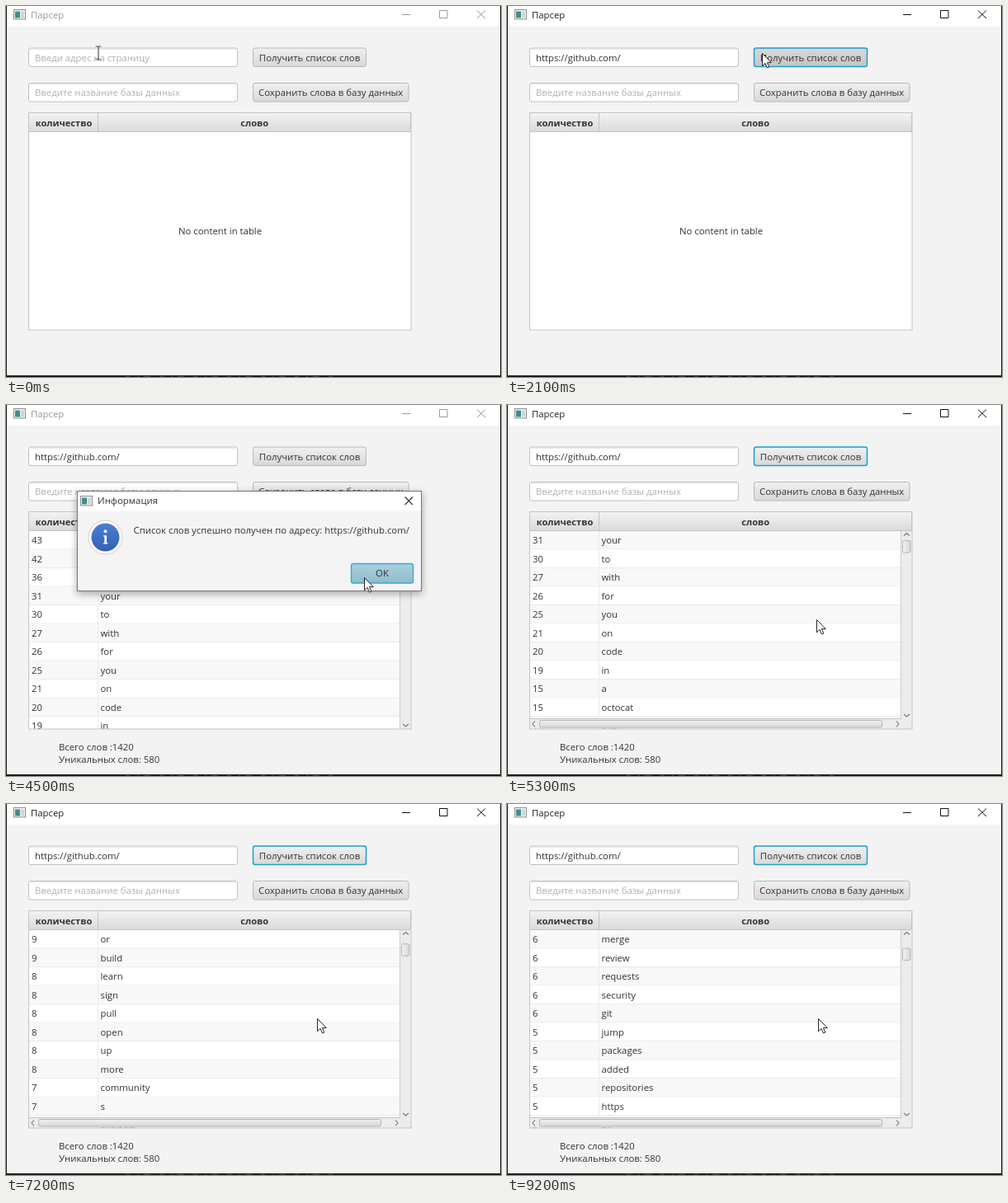
Animation of 600 by 450 pixels, one loop 9700 ms. Source, as an HTML page:

```html
<!DOCTYPE html>
<html lang="ru">
<head>
<meta charset="utf-8">
<title>Парсер</title>
<style>
html, body { margin: 0; width: 100%; height: 100%; overflow: hidden; background: #1c1c1c; }
svg { display: block; width: 600px; height: 450px; }
text { font: 11.35px "Open Sans", "Noto Sans", sans-serif; fill: #333; white-space: pre; }
.mid { text-anchor: middle; }
.head { font-weight: 700; font-size: 11.15px; }
.hint { fill: #b2b2b2; }
.line { fill: none; stroke: #c4c4c4; }
.arrow { fill: none; stroke: #777; stroke-width: 1.1; }
</style>
</head>
<body>
<svg viewBox="0 0 600 450">
  <defs>
    <linearGradient id="btn" x2="0" y2="1"><stop stop-color="#f0f0f0"/><stop offset="1" stop-color="#d8d8d8"/></linearGradient>
    <linearGradient id="btnDown" x2="0" y2="1"><stop stop-color="#d9d9d9"/><stop offset="1" stop-color="#c4c4c4"/></linearGradient>
    <linearGradient id="head" x2="0" y2="1"><stop stop-color="#f3f3f3"/><stop offset="1" stop-color="#d9d9d9"/></linearGradient>
    <linearGradient id="ok" x2="0" y2="1"><stop stop-color="#cdeaf5"/><stop offset="1" stop-color="#b3dbea"/></linearGradient>
    <linearGradient id="okDown" x2="0" y2="1"><stop stop-color="#a9cfdd"/><stop offset="1" stop-color="#92bccb"/></linearGradient>
    <linearGradient id="info" x2="0" y2="1"><stop stop-color="#4a7fd0"/><stop offset="1" stop-color="#3560b4"/></linearGradient>
    <linearGradient id="thumbV"><stop stop-color="#f4f4f4"/><stop offset="1" stop-color="#d6d6d6"/></linearGradient>
    <filter id="shadow" x="-10%" y="-20%" width="120%" height="150%"><feDropShadow dx="0" dy="3" stdDeviation="5" flood-opacity=".35"/></filter>
    <clipPath id="body"><rect x="28" y="153" width="450" height="240"/></clipPath>
    <g id="appIcon">
      <rect x=".5" y=".5" width="14" height="11.5" fill="#f4f4f4" stroke="#8d8d8d"/>
      <rect x="2" y="2.5" width="6" height="8" fill="#3f8f8c"/>
      <rect x="9" y="2.5" width="4" height="8" fill="#cfd6da"/>
    </g>
  </defs>

  <rect width="600" height="450" fill="#1c1c1c"/>
  <path d="M145 449.5H405" stroke="#4a4a4a" stroke-dasharray="5 9 2 6 8 11"/>
  <rect x="1" width="598" height="448" fill="#f3f3f3"/>
  <rect x="1" width="598" height="25" fill="#fff"/>
  <use href="#appIcon" x="9" y="4"/>
  <text id="title" x="30" y="14.5">Парсер</text>
  <path id="controls" d="M480 10.5H490M525.5 5.5H535V14.5H525.5ZM571 5.5L581 15M581 5.5L571 15" fill="none"/>

  <rect id="field" x="27.5" y="51" width="253" height="22.5" rx="2.5" fill="#fff"/>
  <path id="fieldShade" d="M29 52.3H279" stroke="#e4e4e4"/>
  <text id="hint" class="hint" x="35" y="66.5">Введи адрес на страницу</text>
  <text id="url" x="35" y="66.5">https://github.com/</text>
  <path id="caret" stroke="#222" fill="none"/>
  <rect x="27.5" y="93.5" width="253" height="22.5" rx="2.5" fill="#fff" stroke="#c0c0c0"/>
  <path d="M29 94.8H279" stroke="#e4e4e4"/>
  <text class="hint" x="35" y="109">Введите название базы данных</text>

  <rect id="load" x="299.5" y="51" width="137" height="22.5" rx="2.5"/>
  <text class="mid" x="368" y="66.5">Получить список слов</text>
  <rect x="299.5" y="93.5" width="188.5" height="22.5" rx="2.5" fill="url(#btn)" stroke="#b8b8b8"/>
  <text class="mid" x="393.7" y="109">Сохранить слова в базу данных</text>

  <rect x="27.5" y="129.5" width="463.5" height="263.5" fill="#fff"/>
  <rect x="28" y="130" width="462.5" height="23" fill="url(#head)"/>
  <path class="line" d="M28 152.5H491M111.5 130V153M490.5 130V153"/>
  <text class="mid head" x="70" y="146.3">количество</text>
  <text class="mid head" x="301.2" y="146.3">слово</text>
  <text id="empty" class="mid" x="259.5" y="277">No content in table</text>

  <g id="filled">
    <g clip-path="url(#body)"><g id="rows"></g></g>
    <rect x="477.5" y="153" width="13" height="240" fill="#ececec"/>
    <path class="line" d="M477.5 153V393" stroke-opacity=".8"/>
    <path class="arrow" d="M481 158.5L484.5 155.5L488 158.5"/>
    <path id="down" class="arrow" d="M481 -1.5L484.5 1.5L488 -1.5"/>
    <rect id="thumb" x="479.5" width="9.5" height="14.5" rx="2" fill="url(#thumbV)" stroke="#b4b4b4"/>
    <g id="hbar">
      <rect x="28" y="380.5" width="462.5" height="12" fill="#ececec"/>
      <path class="line" d="M28 380.5H478"/>
      <path class="arrow" d="M34 383.5L31 387L34 390.5M472 383.5L475 387L472 390.5"/>
      <rect x="39.5" y="382.5" width="415" height="8.5" rx="2" fill="url(#btn)" stroke="#b4b4b4"/>
    </g>
    <text x="64" y="419">Всего слов :1420</text>
    <text x="64" y="434">Уникальных слов: 580</text>
  </g>
  <rect class="line" x="27.5" y="129.5" width="463.5" height="263.5"/>

  <g id="dialog">
    <rect x="86.5" y="104.5" width="417" height="121" fill="#f4f4f4" stroke="#777" filter="url(#shadow)"/>
    <rect x="87" y="105" width="416" height="23.5" fill="#fff"/>
    <use href="#appIcon" x="90" y="110"/>
    <text x="111" y="120.3">Информация</text>
    <path d="M483.5 111.5L493 121M493 111.5L483.5 121" stroke="#333" stroke-width="1.1"/>
    <circle cx="120.5" cy="160.5" r="20.5" fill="#fff" stroke="#cfcfcf"/>
    <circle cx="120.5" cy="160.5" r="17" fill="url(#info)"/>
    <circle cx="120.5" cy="153.3" r="2" fill="#fff"/>
    <path d="M118 158.2H122V167.3H123.5V168.5H117.8V167.3H119.3V159.5H118Z" fill="#fff"/>
    <text x="154.5" y="156">Список слов успешно получен по адресу: https://github.com/</text>
    <rect id="okBtn" x="418.5" y="192.5" width="75" height="23.5" rx="2.5" stroke="#3aa9cf" stroke-width="1.4"/>
    <text class="mid" x="456" y="208.2">OK</text>
  </g>

  <path id="beam" d="M-3.5 -8H-1Q0 -8 0 -7V7Q0 8 -1 8H-3.5M3.5 -8H1Q0 -8 0 -7M0 7Q0 8 1 8H3.5" fill="none" stroke="#555" stroke-width="1.2"/>
  <path id="mouse" d="M.5 .5V15.8L4 12.4L6.5 18L8.8 17L6.4 11.6H11.3Z" fill="#fff" stroke="#222"/>
</svg>
<script>
const LOOP = 9700, ROW = 22.5, TOP = 153;
const $ = id => document.getElementById(id);
const set = (id, attrs) => {
  for (const k in attrs) $(id).setAttribute(k, attrs[k]);
};
const show = (id, on) => set(id, { visibility: on ? "visible" : "hidden" });

const words = ("43 and,42 the,36 of,31 your,30 to,27 with,26 for,25 you,21 on,20 code,19 in,15 a,15 octocat," +
  "14 this,12 is,11 we,10 it,10 can,9 or,9 build,8 learn,8 sign,8 pull,8 open,8 up,8 more,7 community,7 s," +
  "7 projects,7 teams,7 from,6 team,6 free,6 merge,6 review,6 requests,6 security,6 git,5 jump,5 packages," +
  "5 added,5 repositories,5 https,5 by,5 how").split(",");

$("rows").innerHTML = words.map((entry, i) => {
  const [count, word] = entry.split(" "), y = TOP + i * ROW;
  return `<rect x="28" y="${y}" width="450" height="${ROW}" fill="${i % 2 ? "#f8f8f8" : "#fff"}"/>
    <path d="M28 ${y + ROW - .5}H478M111.5 ${y}V${y + ROW}" stroke="#ebebeb"/>
    <text x="31" y="${y + 15.2}">${count}</text><text x="114.5" y="${y + 15.2}">${word}</text>`;
}).join("");

// Each wheel tick moves the list by three rows.
const ticks = [5300, 5500, 6000, 6300, 6700, 7100, 7600, 8000, 8400, 8800, 9200];

// Pointer stops: time, x, y
const path = [[600, 112, 57], [1300, 309, 57], [3600, 309, 57], [4200, 434, 209],
  [4800, 434, 209], [5100, 375, 260], [5500, 375, 260], [5700, 377, 260]];

function pointer(t) {
  const n = path.findIndex(p => p[0] > t);
  if (n === 0) return path[0].slice(1);
  if (n < 0) return path[path.length - 1].slice(1);
  const a = path[n - 1], b = path[n];
  const k = (t - a[0]) / (b[0] - a[0]), e = k * k * (3 - 2 * k);
  return [a[1] + (b[1] - a[1]) * e, a[2] + (b[2] - a[2]) * e];
}

function drawDialog(t) {
  const open = Math.min(1, Math.max(0, (t - 3300) / 300));
  const close = Math.min(1, Math.max(0, (t - 4700) / 300));
  const k = open * (1 - close), s = .928 + .072 * k;
  show("dialog", k > 0);
  set("dialog", {
    opacity: k ** .8,
    transform: `translate(295 165) scale(${s}) translate(-295 -165)`
  });
  const over = t >= 4100 && t < 4800;
  set("okBtn", { fill: over && t >= 4500 ? "url(#okDown)" : over ? "#c9ebf7" : "url(#ok)" });
}

function render(ms) {
  const t = Math.floor(ms / 100) * 100;
  const active = t >= 100 && t < 3400 || t >= 4900;
  const typing = t >= 200 && t < 1500;
  const pasted = t >= 700;
  const pressed = t >= 1500 && t < 3600;
  const filled = t >= 3600;
  const scrolled = t >= 5300;

  set("title", { style: `fill:${active ? "#222" : "#999"}` });
  set("controls", { stroke: active ? "#111" : "#999" });

  set("field", { stroke: typing ? "#1c9fd0" : "#c0c0c0", "stroke-width": typing ? 1.5 : 1 });
  show("fieldShade", !typing);
  show("hint", t < 200);
  show("url", pasted);
  show("caret", typing);
  set("caret", { d: pasted ? "M138.5 56V69" : "M35.5 56V69" });

  const focus = pressed || t >= 4900;
  set("load", {
    fill: pressed ? "url(#btnDown)" : "url(#btn)",
    stroke: focus ? "#1c9fd0" : "#b8b8b8",
    "stroke-width": focus ? 1.5 : 1
  });

  const first = 3 * ticks.filter(x => x <= t).length;
  show("empty", !filled);
  show("filled", filled);
  show("hbar", filled && scrolled);
  set("rows", { transform: `translate(0 ${-first * ROW})` });
  set("thumb", { y: 163.3 + first * .355 });
  set("down", { transform: `translate(0 ${scrolled ? 376.5 : 388.5})` });

  drawDialog(t);

  const [x, y] = pointer(t), inField = x < 281 && y < 74;
  show("beam", inField);
  show("mouse", !inField);
  set("beam", { transform: `translate(${x} ${y})` });
  set("mouse", { transform: `translate(${x} ${y})` });
}

const start = performance.now();
function tick() {
  render((performance.now() - start) % LOOP);
  requestAnimationFrame(tick);
}
tick();
</script>
</body>
</html>
```
